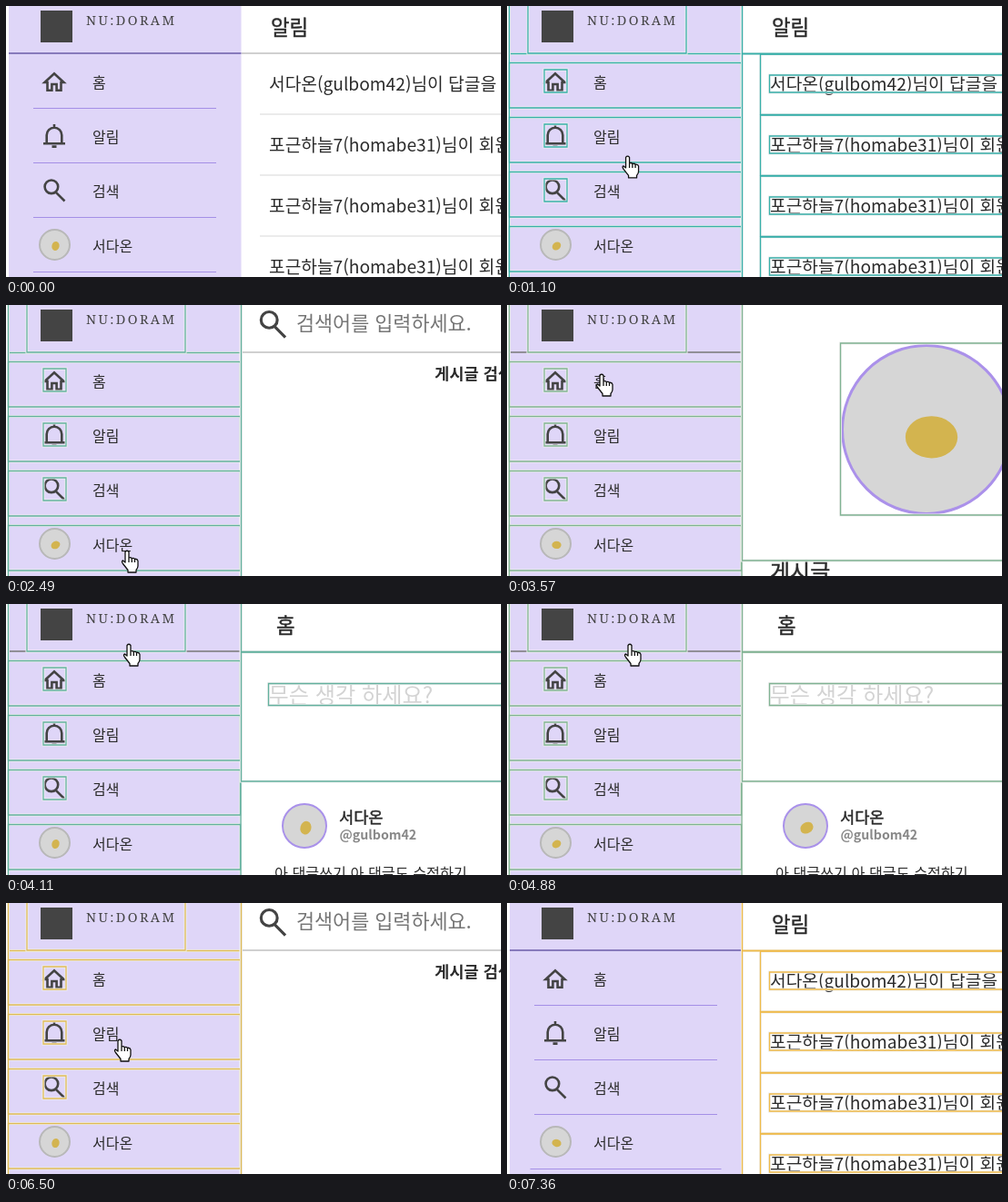
An HTML page for the animation above (7440 ms loop, 544x298 px).

```html
<!DOCTYPE html>
<html lang="ko">
<head>
<meta charset="utf-8">
<style>
html, body { margin: 0; width: 100%; height: 100%; overflow: hidden; background: #fff; }
svg { display: block; width: 544px; height: 298px; font-family: "Noto Sans CJK KR", "Noto Sans", sans-serif; fill: #2b2b2b; }
.halo, .mark { fill: none; }
.halo { stroke: #f0f0f0; stroke-width: 3; }
.mark { stroke: var(--mark); stroke-width: 1.3; }
.icon { fill: none; stroke: #444; stroke-width: 2.6; }
.medium { stroke: #2b2b2b; stroke-width: .45; }
.logo { font-family: "Noto Serif", serif; letter-spacing: 2.4px; fill: #444; }
</style>
</head>
<body>
<svg id="stage" viewBox="0 0 544 298"></svg>
<script>
const LOOP = 7440, CLICK_DELAY = 150, GLIDE = 500, MARK_HOLD = 1050;
const user = '서다온', userId = 'gulbom42';
const follower = '포근하늘7(homabe31)님이 회원님을 팔로우합니다.';
const rows = [0, 1, 2, 3];
const rowY = i => 62 + 60 * i;

// icons are centred on 0,0
const icons = {
  home: 'M-10.5 1L0-8.8L10.5 1H7.5V9.8H2.6V3H-2.6V9.8H-7.5V1Z',
  bell: 'M-12 8.2H12M-8.3 8V-1A8.3 8.3 0 0 1 8.3-1V8M0-9V-13M-2.5 11.6H2.5',
  search: 'M4.2-4.2A7.3 7.3 0 1 1-10.4-4.2A7.3 7.3 0 1 1 4.2-4.2ZM1.8 1.8L11.5 11.5'
};
const icon = (name, x, y, scale = 1) =>
  `<path class="icon" d="${icons[name]}" transform="translate(${x} ${y}) scale(${scale})"/>`;
const text = (s, x, y, size, more = '') => `<text x="${x}" y="${y}" font-size="${size}" ${more}>${s}</text>`;
const line = (x1, x2, y, color, width, more = '') =>
  `<path d="M${x1} ${y}H${x2}" stroke="${color}" stroke-width="${width}" ${more}/>`;
const boxes = list => ['halo', 'mark'].map(c => list.map(([x, y, x2, y2]) =>
  `<path class="${c}" d="M${x} ${y}H${x2}V${y2}H${x}Z"/>`).join('')).join('');
const avatar = (x, y, r, border, width) =>
  `<circle cx="${x}" cy="${y}" r="${r}" fill="#d6d6d6" stroke="${border}" stroke-width="${width}"/>
   <g transform="translate(${x + r * .06} ${y + r * .09}) scale(${r})">
   <ellipse class="pet" rx=".31" ry=".25" fill="#d3b44f"/></g>`;
const page = (id, body, marks) => `<g class="page" id="${id}">${body}<g class="marks">${boxes(marks)}</g></g>`;
const headLine = line(259, 544, 52, '#d0d0d0', 2);
const RIGHT = 560, BOTTOM = 310, TOP = -5;

const sidebar = `
  <rect x="3" width="255.5" height="298" fill="#dfd6f8"/>
  ${line(3, 258.5, 52, '#6a5ba8', 1.6, 'id="rule"')}
  ${rows.map(() => '<path class="under" stroke="#a48fe6" stroke-width="1.1"/>').join('')}
  <rect x="38" y="5" width="35" height="35" fill="#444"/>
  ${text('NU:DORAM', 88, 21, 14.5, 'class="logo"')}
  ${Object.keys(icons).map((name, i) => icon(name, 53, rowY(i) + 21)).join('')}
  ${avatar(53.5, 262.5, 16.5, '#b8b8b8', 2)}
  ${['홈', '알림', '검색', user].map((s, i) => text(s, 95, rowY(i) + 28, 16)).join('')}
  <g id="side">
    <g id="nav">${boxes([[2.5, 52.5, 258, BOTTOM]])}</g>
    ${boxes([[2.5, TOP, 258, BOTTOM], [23, TOP, 197, 52],
      ...rows.map(i => [2.5, rowY(i) + .5, 257.5, rowY(i) + 50]),
      ...rows.slice(0, 3).map(i => [41, rowY(i) + 8, 66, rowY(i) + 33])])}
  </g>`;

const pages =
  page('alarm', headLine + rows.map(i => line(279, 544, 119 + 67 * i, '#ebebeb', 2) +
      text(i ? follower : `${user}(${userId})님이 답글을 남겼습니다.`, 289, 92.5 + 67 * i, 19.2)).join('') +
    text('알림', 291, 31.5, 22.4, 'class="medium"'),
    [[258.5, TOP, RIGHT, 52.5], [258.5, 52.5, RIGHT, BOTTOM],
      ...rows.flatMap(i => [[278.5, 53 + 67 * i, RIGHT, 119.5 + 67 * i], [288.5, 76 + 67 * i, RIGHT, 95 + 67 * i]])]) +
  page('search', headLine + icon('search', 293, 21.5, 1.22) +
    text('검색어를 입력하세요.', 319, 28, 21.8, 'fill="#757575"') +
    text('게시글 검색', 471, 82, 17.6, 'font-weight="700"'),
    [[258.5, TOP, 258.5, BOTTOM]]) +
  page('profile', avatar(461, 137, 92.5, '#ab91ea', 3) + text('게시글', 289, 302, 24, 'class="medium"'),
    [[258.5, TOP, RIGHT, 281], [366.5, 42, 555, 231]]) +
  page('home', headLine + line(259, 544, 195, '#b5b5b5', 2) +
    text('홈', 297, 31.5, 22.4, 'class="medium"') +
    text('무슨 생각 하세요?', 288.5, 109, 24.2, 'fill="#d3d3d3"') +
    avatar(328, 244, 24, '#a991ea', 2) +
    text(user, 366, 241, 17.6, 'class="medium"') +
    text('@' + userId, 366.5, 259, 14.2, 'font-weight="700" fill="#888"') +
    text('아 댓글쓰기 아 댓글도 수정하기', 295, 302, 16.2),
    [[258.5, TOP, RIGHT, 52.5], [258.5, 53, RIGHT, 195], [288.5, 87.5, RIGHT, 111.5]]);

const hand = `<path id="hand" fill="#fff" stroke="#111" stroke-width="1.3" stroke-linejoin="round"
  d="M-2 1.5Q0-1 2 1.5V8q2-1 3.3.6q2-.8 3.2.7q3-.4 3.5 2V17Q12 19 10 21.5V24H1V21.5L-4.5 14.5Q-6.5 11.5-4.5 11L-2 13Z
  M2 8V13M5.3 8.6V13M8.5 9.3V13"/>`;

stage.innerHTML = sidebar + pages + hand;

// where the fingertip arrives, and what its click opens
const stops = [
  { at: 540, x: 140, y: 230 },
  { at: 710, x: 133, y: 158, opens: 'alarm', color: '#37afa9' },
  { at: 1480, x: 130, y: 205, opens: 'search', color: '#63b19e' },
  { at: 2400, x: 133, y: 270, opens: 'profile', color: '#80b393' },
  { at: 3500, x: 104, y: 76, opens: 'home', color: '#63b19e' },
  { at: 4100, x: 135, y: 44, opens: 'home', color: '#80b393' },
  { at: 5780, x: 116, y: 194, opens: 'search', color: '#dfba57' },
  { at: 6500, x: 125, y: 150, opens: 'alarm', color: '#efbb49' },
  { at: 7250, x: 146, y: 300 }
];

function handAt(t) {
  const i = stops.findIndex(s => s.at > t);
  if (i < 1) return null;
  const a = stops[i - 1], b = stops[i];
  const span = Math.min(GLIDE, b.at - a.at);
  const p = Math.max(0, 1 - (b.at - t) / span), q = p * p * (3 - 2 * p);
  return { x: a.x + (b.x - a.x) * q, y: a.y + (b.y - a.y) * q };
}

// share of the last 240 ms that the fingertip spent on a row
function hover(row, t) {
  let hits = 0;
  for (let back = 0; back < 240; back += 10) {
    const p = handAt(t - back);
    if (p && Math.floor((p.y - 53) / 60) === row) hits++;
  }
  return hits / 24;
}

const all = s => [...stage.querySelectorAll(s)];
const show = (el, on) => el.style.display = on ? '' : 'none';
const pageEls = all('.page'), markEls = all('.marks'), lines = all('.under'), pets = all('.pet');
const [side, nav, rule, handEl] = ['side', 'nav', 'rule', 'hand'].map(id => document.getElementById(id));

function draw(t) {
  const click = stops.findLast(s => s.opens && s.at + CLICK_DELAY <= t);
  const name = click ? click.opens : 'alarm';
  const marked = click && t - click.at - CLICK_DELAY < MARK_HOLD;
  const tip = handAt(t), sideOn = marked && tip;

  if (marked) stage.style.setProperty('--mark', click.color);
  pageEls.forEach(el => show(el, el.id === name));
  markEls.forEach(el => show(el, marked));
  show(side, sideOn);
  show(nav, name === 'alarm' || name === 'search');
  rule.setAttribute('stroke', sideOn ? '#777' : '#6a5ba8');

  lines.forEach((el, i) => {
    const grow = 18 * hover(i, t);
    el.setAttribute('d', `M${30 - grow} ${rowY(i) + 50.5}H${231 + grow}`);
  });
  pets.forEach(el => el.setAttribute('transform', `rotate(${(t - 3570) / 342 * 180})`));

  show(handEl, tip);
  if (tip) handEl.setAttribute('transform', `translate(${tip.x} ${tip.y})`);
}

const start = performance.now();
function tick() {
  draw((performance.now() - start) % LOOP);
  requestAnimationFrame(tick);
}
tick();
</script>
</body>
</html>
```
